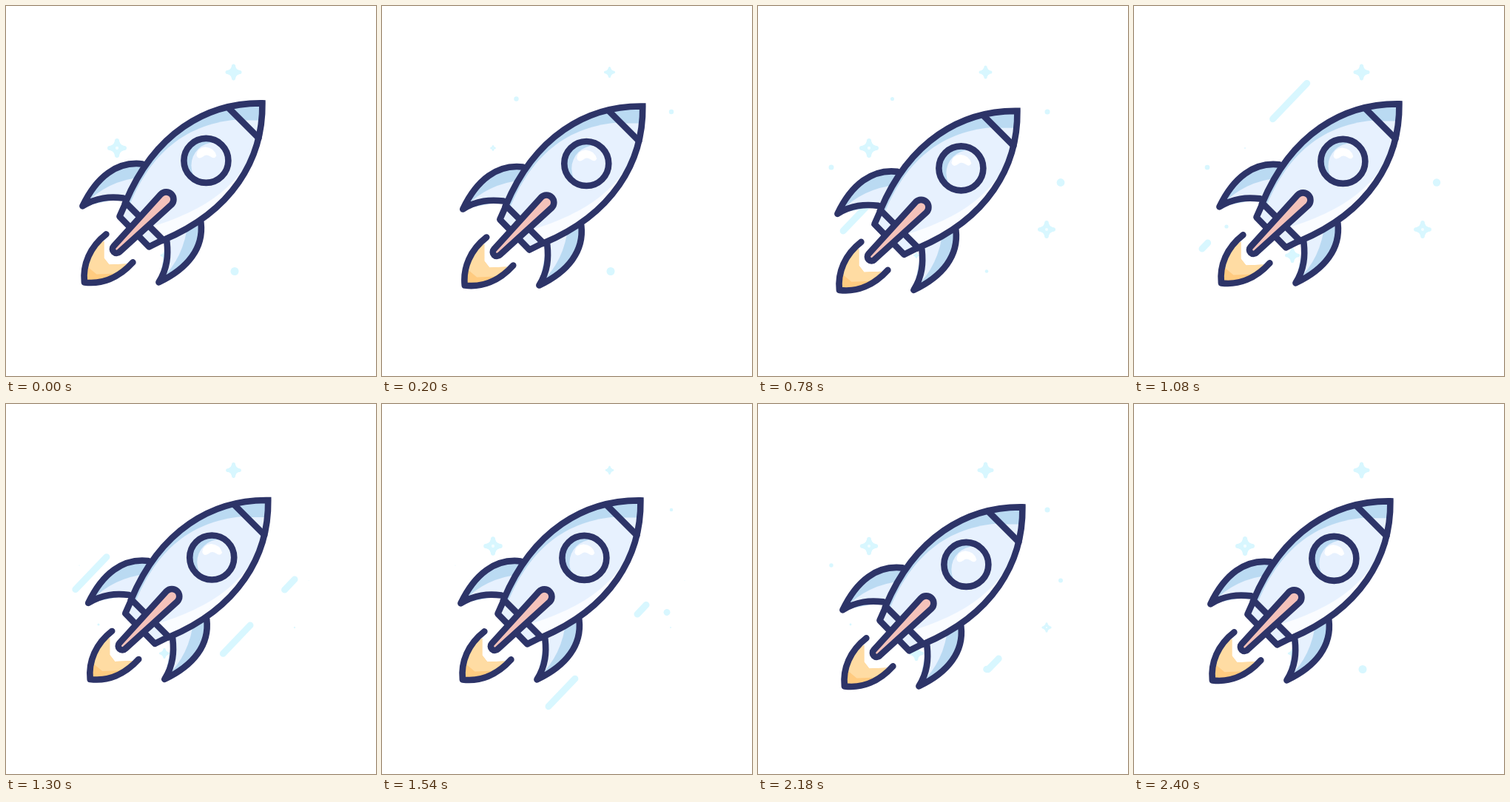
An HTML page for the animation above (2420 ms loop, 500x500 px).

```html
<!DOCTYPE html>
<html lang="en">
<head>
<meta charset="utf-8">
<title>Rocket</title>
<style>
  html, body { margin: 0; width: 100%; height: 100%; overflow: hidden; background: #fff; }
  svg { display: block; width: 100vw; height: 100vh; }
  .line { fill: none; stroke: #2d3468; stroke-width: 8.6; stroke-linecap: round; stroke-linejoin: round; }
  .shade { fill: #badaf2; }
  .light { fill: #e7f1fe; }
  .sky { fill: #d8f7ff; }
  .streak { stroke: #d8f7ff; stroke-width: 9; stroke-linecap: round; }
</style>
</head>
<body>
<svg viewBox="0 0 500 500">
  <defs>
    <path id="hull" d="M346 131C270 130 200 172 161 265L212 316C305 277 347 207 346 131Z"/>
    <path id="finEdge" d="M184 213C150 209 122 230 103 270C122 258 140 257 158 259"/>
    <path id="bar" d="M208.800 254A10 10 0 0 1 223.200 268L153 331.800A5.500 5.500 0 0 1 145 324.200Z"/>
    <clipPath id="inHull"><use href="#hull"/></clipPath>
    <clipPath id="inFin"><use href="#finEdge"/></clipPath>
    <clipPath id="inGlass"><circle cx="270" cy="208.500" r="30"/></clipPath>
    <g id="fin">
      <path d="M184 213L158 259L103 270C122 230 150 209 184 213Z" class="shade"/>
      <path d="M106 268Q138 233 192 230L180 270Z" class="light" clip-path="url(#inFin)"/>
      <use href="#finEdge" class="line"/>
    </g>
  </defs>

  <g id="sky"></g>

  <g id="rocket">
    <use href="#fin"/>
    <use href="#fin" transform="matrix(0 -1 -1 0 476 476)"/>

    <path d="M161 266L153 284L193 325L211 316Z" class="light"/>
    <path d="M161 266L153 284L193 325L211 316" class="line"/>

    <g clip-path="url(#inHull)">
      <use href="#hull" class="shade"/>
      <path d="M350 153C268 147 203 178 166 270L213 320L350 210Z" class="light"/>
      <path d="M346 165C325 235 280 272 196 298L213 320C300 285 350 220 346 165Z" fill="#fafcff"/>
      <path d="M301 137L342 178L355 120Z" class="shade"/>
      <path d="M318 154L342 178L350 154Z" class="light"/>
    </g>
    <use href="#hull" class="line" style="stroke-linejoin:miter"/>
    <path d="M301 138L341 178" class="line"/>

    <g clip-path="url(#inGlass)">
      <circle cx="270" cy="208.500" r="30" class="shade"/>
      <circle cx="281" cy="215" r="31" class="light"/>
      <path d="M257 201Q258 191 269 190Q281 191 284 202Q281 207 276 203Q270 199 266 203Q259 208 257 201Z" fill="#fff"/>
    </g>
    <circle cx="270" cy="208.500" r="30" class="line"/>

    <use href="#bar" fill="#f4c2ba"/>
    <use href="#bar" class="line"/>

    <path d="M132 317C114 329 105 350 107 372C128 375 147 365 163 348L139 349L132 340Z" fill="#ffcb80"/>
    <path d="M132 317C119 327 111 339 110 352L122 362L147 361L163 348L139 349L132 340Z" fill="#ffdca3"/>
    <path d="M135 308C113 325 103 349 105.500 373C129 376 152 367 171 346" class="line"/>
  </g>
</svg>
<script>
const LOOP = 2420;
const LANE_SLOPE = 1.045;
const sky = document.getElementById('sky');
const rocket = document.getElementById('rocket');

const clamp = p => Math.min(1, Math.max(0, p));
const ease = p => (1 - Math.cos(Math.PI * clamp(p))) / 2;
const mix = (a, b, p) => a + (b - a) * p;

function add(tag, attrs, parent = sky) {
  const el = document.createElementNS('http://www.w3.org/2000/svg', tag);
  for (const k in attrs) el.setAttribute(k, attrs[k]);
  return parent.appendChild(el);
}

// Drift of the rocket: [time, x, y], joined by a smooth curve.
const drift = [
  [0, 0, 0], [400, 14, 12], [550, 13, 21], [780, 4, 10.5], [1080, 12, 1],
  [1540, 3, -1], [1920, 10, 10], [2180, 11, 8], [2400, 0, 0], [LOOP, 0, 0]
];

function driftAt(t, axis) {
  const slope = i => i < 1 || i > drift.length - 2 ? 0
    : (drift[i + 1][axis] - drift[i - 1][axis]) / (drift[i + 1][0] - drift[i - 1][0]);
  const i = drift.findIndex((k, n) => n && t < k[0]) - 1;
  const a = drift[i], b = drift[i + 1];
  const d = b[0] - a[0], p = (t - a[0]) / d, q = 1 - p;
  return a[axis] * q * q * (1 + 2 * p) + b[axis] * p * p * (3 - 2 * p)
    + d * p * q * (slope(i) * q - slope(i + 1) * p);
}

// Sparkles swell around each peak and are at their least size beyond `span` ms of it.
const stars = [
  { x: 307.5, y: 89.5, r: 11, peaks: [1080, 2250], span: 500, least: .47 },
  { x: 150, y: 192, r: 13, peaks: [740, 1680, 2000, 2330], span: 360, hole: true },
  { x: 390, y: 302, r: 12, peaks: [930, 1920], span: 400, hole: true },
  { x: 214, y: 337, r: 10, peaks: [1080, 2160], span: 400 }
];
const dots = [
  { x: 309, y: 358.5, r: 5.5, peaks: [150], span: 850 },
  { x: 181.5, y: 125.5, r: 4.7, peaks: [470], span: 470 },
  { x: 391, y: 143, r: 5, peaks: [500, 1900], span: 500 },
  { x: 409, y: 238.5, r: 5.4, peaks: [920, 1920], span: 400 },
  { x: 99, y: 218, r: 3.5, peaks: [900, 1950], span: 450 },
  { x: 125, y: 298, r: 2.6, peaks: [1080, 1950], span: 350 }
];

function sizeAt(s, t) {
  const gap = Math.min(...s.peaks.map(p => {
    const d = Math.abs(t - p);
    return Math.min(d, LOOP - d);
  }));
  return s.r * mix(s.least || 0, 1, clamp(1.6 * (1 - gap / s.span)));
}

// Each streak runs down its lane from x to `to`; the tail follows `lag` of the run later.
const streaks = [
  { x: 287, y: 110, to: 140, start: 252, run: 600, lag: .2 },
  { x: 205, y: 210, to: 92, start: 164, run: 880, lag: .21 },
  { x: 260, y: 77, to: 76, start: 822, run: 600, lag: .185 },
  { x: 330, y: 299, to: 225, start: 1140, run: 400, lag: .4 },
  { x: 390, y: 237, to: 345, start: 1172, run: 350, lag: .4 },
  { x: 385, y: 281.5, to: 310, start: 1535, run: 700, lag: .22 }
];

const arm = 'M0 0L-8 -3Q-4 -4 -3 -8Q-3 -12 0 -12Q3 -12 3 -8Q4 -4 8 -3Z';
for (const s of stars) {
  s.el = add('g', { class: 'sky' });
  for (let a = 0; a < 360; a += 90) add('path', { d: arm, transform: `rotate(${a})` }, s.el);
  add('circle', { r: 5 }, s.el);
  if (s.hole) add('circle', { r: 2, fill: '#f4fdff' }, s.el);
}
for (const d of dots) d.el = add('circle', { cx: d.x, cy: d.y, class: 'sky' });
for (const s of streaks) s.el = add('line', { class: 'streak' });

function drawStreak(s, t) {
  const p = (t - s.start) / s.run;
  const on = p >= 0 && p < 1 + s.lag;
  s.el.setAttribute('visibility', on ? 'visible' : 'hidden');
  if (!on) return;
  [p, p - s.lag].forEach((q, i) => {
    const x = mix(s.x, s.to, ease(q));
    s.el.setAttribute('x' + (i + 1), x);
    // A hair of length keeps the round cap visible.
    s.el.setAttribute('y' + (i + 1), s.y - LANE_SLOPE * (x - s.x) + i * .01);
  });
}

function draw(t) {
  rocket.setAttribute('transform', `translate(${driftAt(t, 1) + .4} ${driftAt(t, 2) + .4})`);
  for (const s of stars)
    s.el.setAttribute('transform', `translate(${s.x} ${s.y}) scale(${sizeAt(s, t) / 12})`);
  for (const d of dots) d.el.setAttribute('r', sizeAt(d, t));
  for (const s of streaks) drawStreak(s, t);
}

const start = performance.now();
function tick() {
  draw(Math.max(0, performance.now() - start) % LOOP);
  requestAnimationFrame(tick);
}
tick();
</script>
</body>
</html>
```
